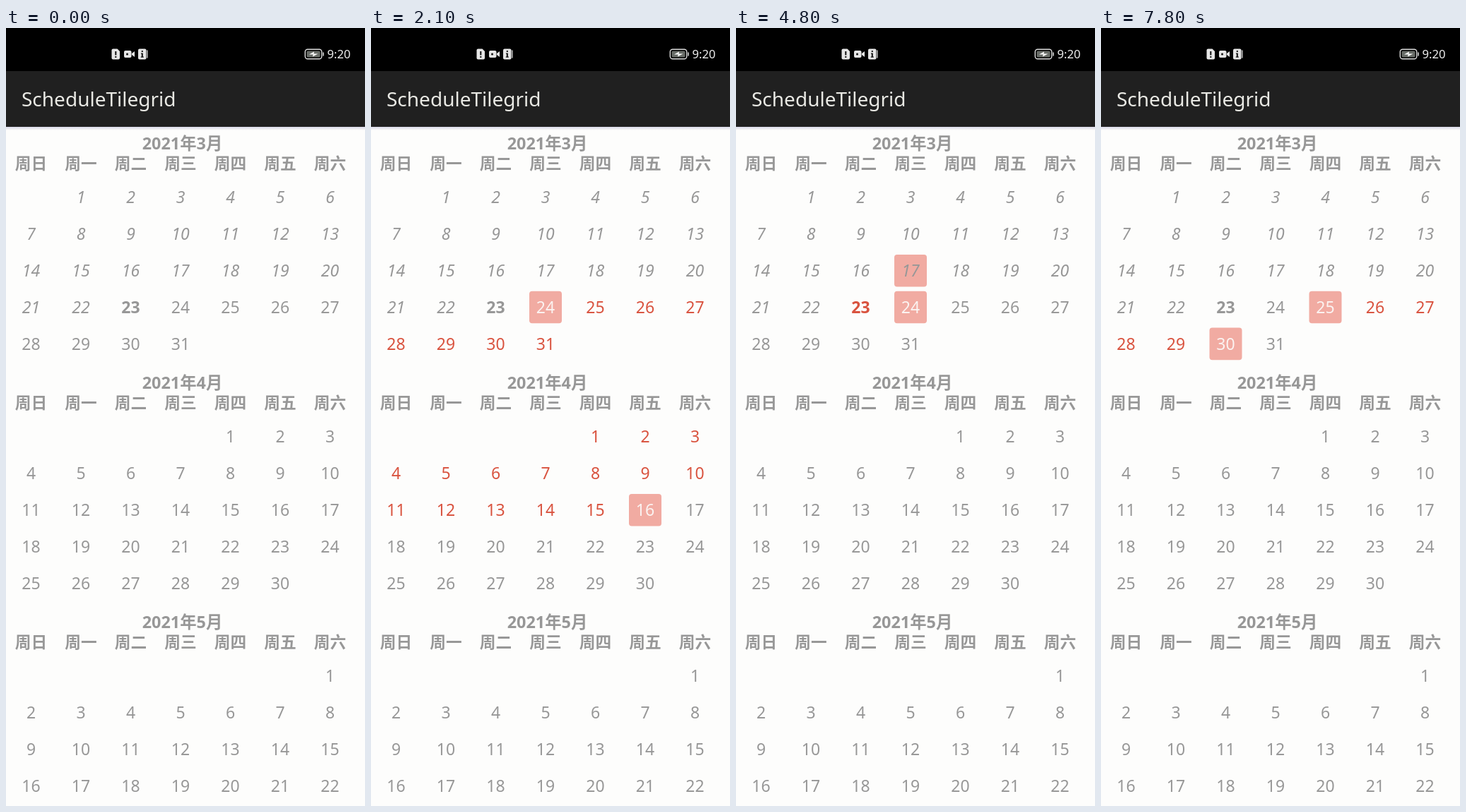
These frames come from a looping animation (508x1102 px, 8000 ms). An HTML page:

```html
<!DOCTYPE html>
<html lang="zh-CN">
<head>
<meta charset="utf-8">
<title>ScheduleTilegrid</title>
<style>
  html, body { margin: 0; width: 100%; height: 100%; overflow: hidden; background: #fdfdfc; }
  svg { display: block; width: 508px; height: 1102px; }
  text { font: 23px "Noto Sans", "Noto Sans CJK SC", "Noto Sans CJK", sans-serif; }
  #calendar text { fill: #979797; text-anchor: middle; }
  #calendar .bold { font-weight: 700; }
  #calendar .title { font-size: 23.4px; }
  #calendar .week { font-size: 22.7px; }
  #calendar .past { font-style: italic; }
  #calendar .range { fill: #d9533f; }
  #calendar .picked { fill: #fbf3f1; }
  #calendar rect { fill: #f1aba2; visibility: hidden; }
  #bar { font-size: 28px; font-weight: 500; fill: #e9e9e4; }
  #clock { font-size: 16.7px; font-weight: 500; fill: #eee; }
</style>
</head>
<body>
<svg viewBox="0 0 508 1102">
  <defs>
    <linearGradient id="shade" x2="0" y2="1">
      <stop offset="0" stop-color="#d8d8e8"/>
      <stop offset="1" stop-color="#fdfdfc"/>
    </linearGradient>
  </defs>
  <rect width="508" height="1102" fill="#fdfdfc"/>
  <rect y="140" width="508" height="5" fill="url(#shade)"/>
  <rect width="508" height="61" fill="#000"/>
  <rect y="61" width="508" height="79" fill="#202020"/>

  <g fill="#e6e6e6">
    <path d="M151.5 29.500h6l3.500 3.500v9.500a2 2 0 0 1-2 2h-7.500a2 2 0 0 1-2-2v-11a2 2 0 0 1 2-2z"/>
    <rect x="167" y="32" width="10.500" height="10" rx="2"/>
    <path d="M178 36l4-3v8l-4-3z"/>
    <rect x="187" y="29.500" width="11.500" height="15" rx="2"/>
    <path d="M199.300 31.500h1.200v11h-1.200z"/>
  </g>
  <g fill="#111">
    <path d="M154.300 33h2v5.500h-2zM154.300 40h2v2h-2z"/>
    <circle cx="171.500" cy="37" r="1.500"/>
    <path d="M191.800 32h2v2h-2zM191 35.500h2.800v5h1v1.300h-4v-1.300h1v-3.700h-.800z"/>
  </g>
  <rect x="423.300" y="30.300" width="23.500" height="13.500" rx="3.500" fill="none" stroke="#ddd" stroke-width="1.400"/>
  <rect x="425.500" y="32.500" width="19" height="9" rx="1.800" fill="#686c67"/>
  <path d="M448.300 34.500h1.500v5h-1.500z" fill="#ddd"/>
  <path d="M429 37.500l7-4-.500 3h6l-7.500 4 .700-3z" fill="#fff"/>
  <text id="clock" x="454.500" y="43">9:20</text>
  <text id="bar" x="22" y="111">ScheduleTilegrid</text>

  <g id="calendar"></g>
  <circle id="touch" r="16" fill="#fdfdfc" fill-opacity=".55" stroke="#c9c9e6" stroke-width="2" visibility="hidden"/>
</svg>
<script>
const LOOP = 8000, TODAY = 323;
const COL = 70.5, ROW = 51.85, MONTH = 339;

// month, weekday of the 1st, days shown
const months = [[3, 1, 31], [4, 4, 30], [5, 6, 22]];

// press, release, x, y, then the chosen span as month * 100 + day
const taps = [
  [500, 800, 256, 404, 324, 324],
  [1300, 1600, 396, 680, 324, 416],
  [3500, 3800, 253, 335, 317, 317],
  [4400, 4700, 256, 410, 317, 324],
  [5500, 6000, 326, 384, 325, 325],
  [7300, 7600, 184, 455, 325, 330]
];

const calendar = document.getElementById("calendar");
const touch = document.getElementById("touch");
const days = [];

function add(tag, attrs, label = "") {
  const el = document.createElementNS("http://www.w3.org/2000/svg", tag);
  for (const key in attrs) el.setAttribute(key, attrs[key]);
  el.textContent = label;
  return calendar.appendChild(el);
}

const colX = i => 35.5 + i * COL;

months.forEach(([month, first, count], m) => {
  const top = m * MONTH;
  add("text", { x: 249.5, y: top + 172.2, class: "bold title" }, `2021年${month}月`);
  [..."日一二三四五六"].forEach((name, i) =>
    add("text", { x: colX(i), y: top + 200.2, class: "bold week" }, "周" + name));

  for (let d = 1; d <= count; d++) {
    const slot = first + d - 1;
    const x = colX(slot % 7);
    const y = top + 240.2 + Math.floor(slot / 7) * ROW;
    const date = month * 100 + d;
    const base = date < TODAY ? "past" : date === TODAY ? "bold" : "";
    const box = add("rect", { x: x - 23, y: y - 23, width: 46, height: 45.6, rx: 4 });
    const text = add("text", { x, y: y + 8.2, class: base }, d);
    days.push({ date, base, box, text });
  }
});

function select(from, to) {
  for (const { date, base, box, text } of days) {
    const picked = date === from || date === to;
    const inside = date > from && date < to;
    box.style.visibility = picked ? "visible" : "hidden";
    const state = date < TODAY ? "" : picked ? " picked" : inside ? " range" : "";
    text.setAttribute("class", base + state);
  }
}

let shown = null;

function draw(now) {
  const t = now % LOOP;
  const done = taps.filter(tap => t >= tap[1]).length;
  if (done !== shown) {
    shown = done;
    const [from, to] = done ? taps[done - 1].slice(4) : [0, 0];
    select(from, to);
  }
  const press = taps.find(tap => t >= tap[0] && t < tap[1]);
  touch.setAttribute("visibility", press ? "visible" : "hidden");
  if (press) {
    touch.setAttribute("cx", press[2]);
    touch.setAttribute("cy", press[3]);
  }
}

const start = performance.now();
function tick() {
  draw(performance.now() - start);
  requestAnimationFrame(tick);
}
tick();
</script>
</body>
</html>
```
